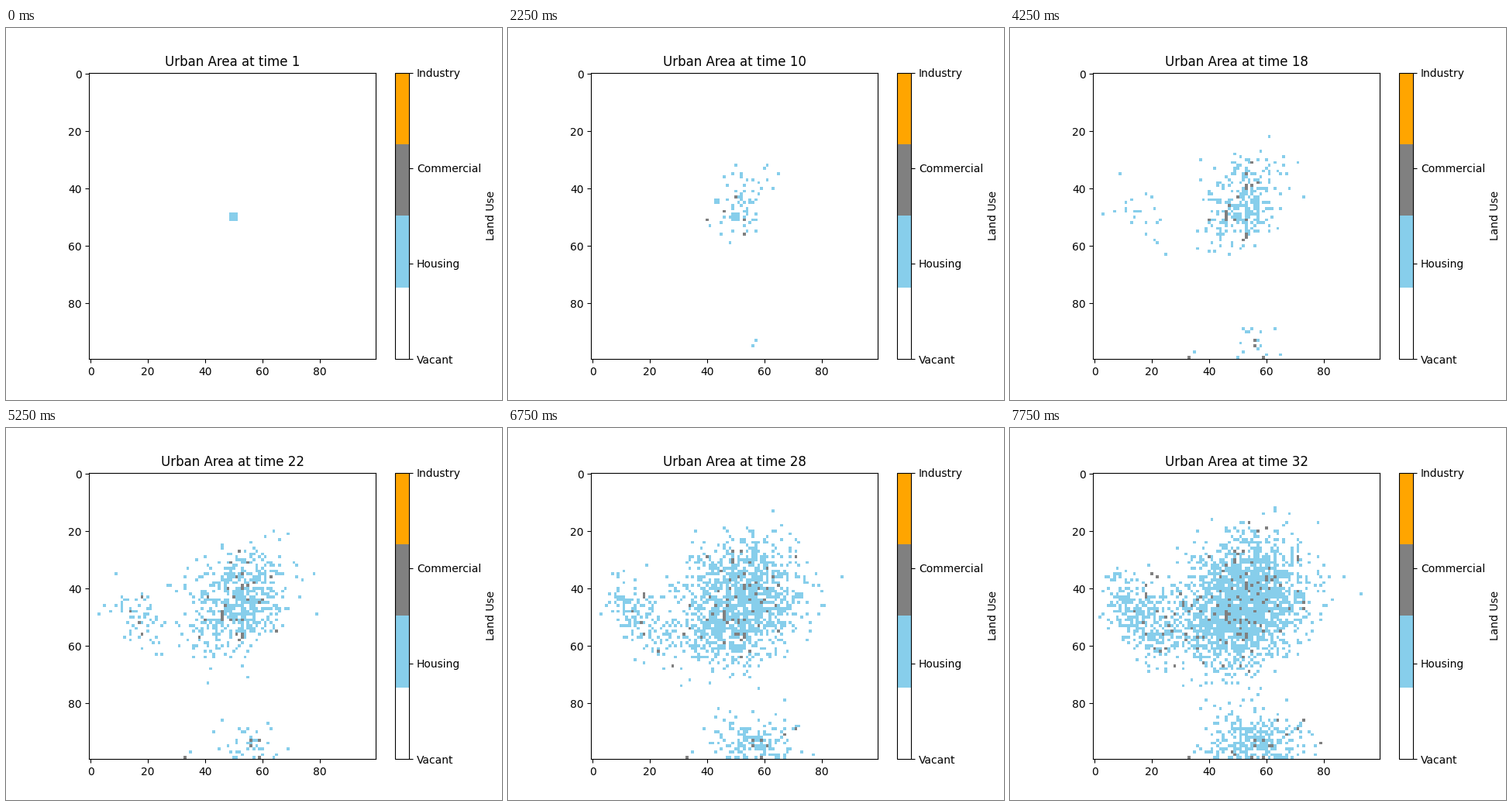
A matplotlib script that plays this animation: 640x480 px, repeating every 8 s.

```python
import numpy as np
import matplotlib.pyplot as plt
from matplotlib.animation import FuncAnimation
from matplotlib.colors import ListedColormap

SIZE, STEPS = 100, 32
HOUSING, COMMERCIAL = 1, 2
KEYS = [1, 10, 18, 26, 32]  # times of the growth curves below

# Scattered pioneers and first shops: first time, last time, cells as (x, y)
HOMES = [
    (4, 10, [(57, 93), (58, 42), (56, 95), (41, 53), (45, 56), (50, 32),
             (61, 37), (60, 33), (65, 35)]),
    (11, 18, [(11, 45), (15, 48), (7, 48), (21, 58), (58, 90), (25, 63),
              (35, 97), (37, 30), (73, 43)]),
    (19, 28, [(61, 22), (79, 49), (66, 18), (63, 13)]),
]
SHOPS = [
    (8, 10, [(50, 43), (46, 48), (40, 51), (53, 51), (53, 56)]),
    (12, 18, [(53, 40), (56, 93), (33, 99), (59, 99), (55, 31)]),
]

# Each town: centre, shear, density, width and height along KEYS
TOWNS = [
    dict(centre=(51.5, 45), shear=-0.2, density=[0, 0.42, 0.9, 1.8, 3.1],
         width=[2, 4.5, 7, 10.5, 11.2], height=[2, 5.7, 8.4, 10.7, 11.6]),
    dict(centre=(18, 51), shear=0.45, density=[0, 0, 0.06, 0.5, 1.25],
         width=[5, 5, 5, 5, 6.2], height=[6, 6, 6, 7, 8]),
    dict(centre=(55, 95), shear=0, density=[0, 0, 0.08, 0.4, 1.1],
         width=[5, 5, 5, 8, 10], height=[5, 5, 5, 6, 7]),
]
SHOP_SHARE = [0, 0, 0.03, 0.06, 0.085]


def town_field(town, t, x, y):
    """Growth pressure of one town at time t."""
    cx, cy = town["centre"]
    amount, width, height = (np.interp(t, KEYS, town[k])
                             for k in ("density", "width", "height"))
    dy = y - cy
    dx = x - cx - town["shear"] * dy
    r = np.hypot(dx / width, dy / height)
    return amount * np.exp(-0.5 * r ** 2.2)


def mark(mask, groups, t):
    for first, last, cells in groups:
        births = np.linspace(first, last, len(cells)).round()
        for born, (x, y) in zip(births, cells):
            if born <= t:
                mask[y, x] = True


def grow():
    rng = np.random.default_rng(12)
    luck = rng.random((SIZE, SIZE))
    trade = rng.random((SIZE, SIZE))
    y, x = np.mgrid[:SIZE, :SIZE]
    core = np.exp(-((x - 50) ** 2 + (y - 45) ** 2) / 300)
    built = np.zeros((SIZE, SIZE), bool)
    built[49:52, 49:52] = True
    shops = np.zeros_like(built)
    grids = []
    for t in range(1, STEPS + 1):
        pressure = sum(town_field(town, t, x, y) for town in TOWNS)
        built |= luck < 1 - np.exp(-pressure)
        mark(built, HOMES, t)
        share = np.interp(t, KEYS, SHOP_SHARE) * (0.7 + 0.7 * core)
        shops |= built & (trade < share)
        mark(shops, SHOPS, t)
        grids.append(np.where(shops, COMMERCIAL, built * HOUSING))
    return grids


grids = grow()
fig, ax = plt.subplots(figsize=(6.4, 4.8), dpi=100)
land = ListedColormap(["white", "skyblue", "gray", "orange"])
image = ax.imshow(grids[0], cmap=land, vmin=0, vmax=3, interpolation="nearest")
bar = fig.colorbar(image, ax=ax, ticks=range(4), label="Land Use")
bar.ax.set_yticklabels(["Vacant", "Housing", "Commercial", "Industry"])
title = ax.set_title("Urban Area at time 1")


def update(i):
    image.set_data(grids[i])
    title.set_text(f"Urban Area at time {i + 1}")
    return image, title


anim = FuncAnimation(fig, update, frames=STEPS, interval=250, repeat=True)
plt.show()
```
